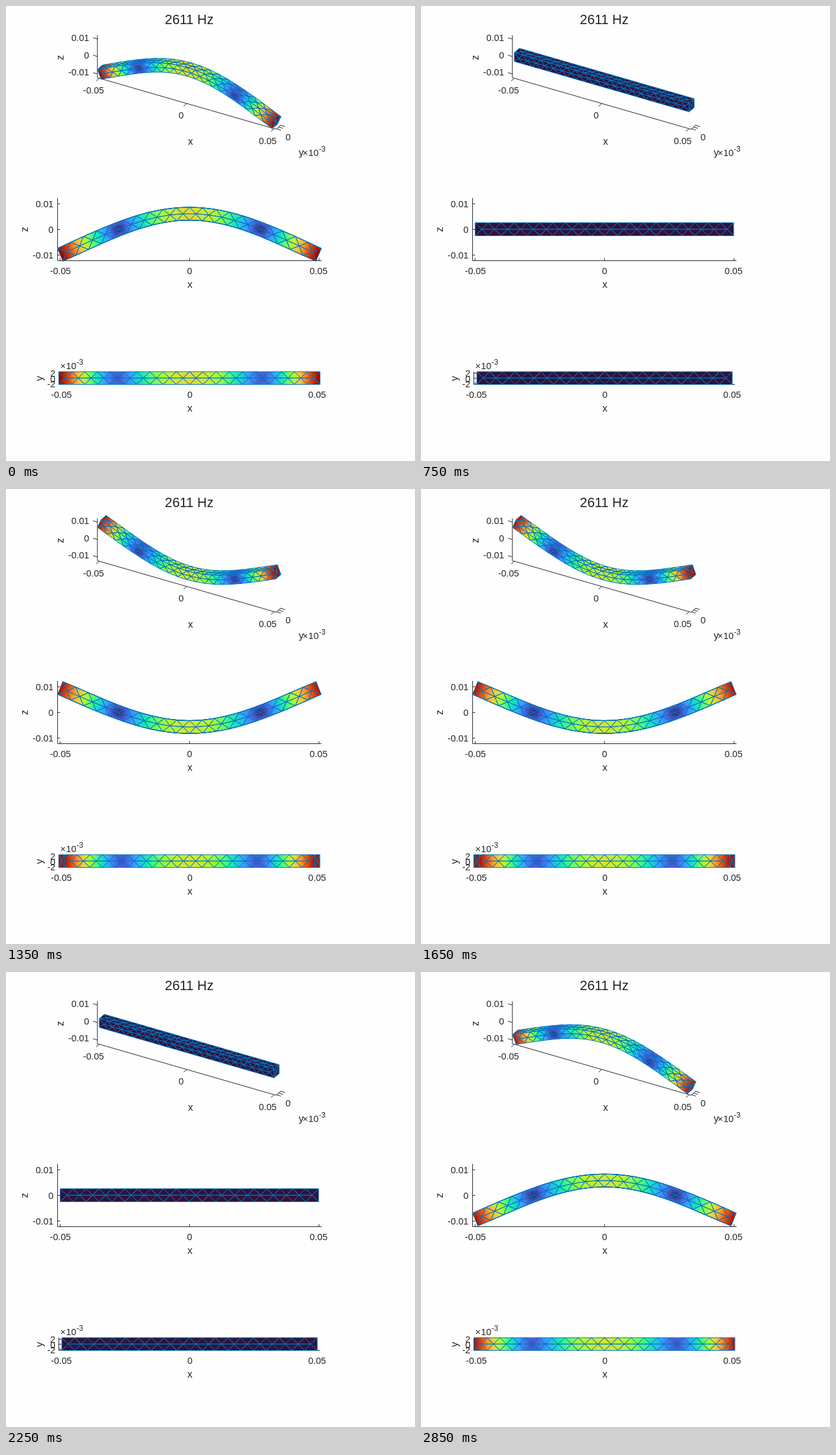
Recreate the animation shown at these times as an HTML page with a canvas. Size 654 by 728 pixels, loop 3 s.

```html
<!DOCTYPE html>
<html lang="en">
<head>
<meta charset="utf-8">
<title>Beam bending mode</title>
<style>
  html, body { margin: 0; width: 654px; height: 728px; overflow: hidden; background: #fefefe; }
  svg, canvas { position: absolute; left: 0; top: 0; display: block; }
  text { font-family: "Liberation Sans", Arial, sans-serif; font-size: 14.67px; fill: #262626; }
  .label { font-size: 16.1px; }
  .title { font-size: 21.33px; }
  .sup { font-size: 12px; }
</style>
</head>
<body>
<svg id="axes" width="654" height="728" viewBox="0 0 654 728"></svg>
<canvas id="beam" width="654" height="728"></canvas>
<script>
const LOOP = 3000, STEP = 150;
const L = 0.1, H = 0.0025, N = 20;
const AMP = 0.0099, PEAK = 0.01, SHEAR = 0.92;
const X_LIM = 0.0511, Z_LIM = 0.01215;

// ---- views: [x, y, z] in metres to screen pixels
const S = 3228, C30 = Math.cos(Math.PI / 6);
const iso = ([x, y, z]) => [
  293 + S * (C30 * x + 0.5 * y),
  118.5 + S * (0.25 * x - 0.5 * C30 * y - C30 * z)
];
const front = ([x, y, z]) => [293.3 + 4132 * x, 357.2 - 4132 * z];
const above = ([x, y, z]) => [293.5 + 4085 * x, 595.3 - 4085 * y];

// ---- axes and labels
const axes = document.getElementById("axes");

function add(tag, attrs, content) {
  const el = document.createElementNS("http://www.w3.org/2000/svg", tag);
  for (const k in attrs) el.setAttribute(k, attrs[k]);
  if (content) el.textContent = content;
  axes.appendChild(el);
}
const line = (...pts) => add("polyline", {
  points: pts.map(p => p.join()).join(" "), fill: "none", stroke: "#262626", "stroke-width": 1
});
const text = (s, x, y, anchor = "middle", cls = "") =>
  add("text", { x, y, "text-anchor": anchor, class: cls }, s);
const upright = (s, x, y) => add("text", {
  transform: `translate(${x} ${y}) rotate(-90)`, "text-anchor": "middle", class: "label"
}, s);
const tick = ([x, y], dx, dy) => line([x, y], [x + dx, y + dy]);

function power(x, y) {
  text("×", x, y, "start");
  text("10", x + 9.3, y, "start");
  text("-3", x + 26, y - 7, "start", "sup");
}

text("2611 Hz", 293, 29, "middle", "title");

// perspective-style view
line(iso([-X_LIM, -H, Z_LIM]), iso([-X_LIM, -H, -Z_LIM]),
     iso([X_LIM, -H, -Z_LIM]), iso([X_LIM, H, -Z_LIM]));
for (const v of [-1, 0, 1]) {
  tick(iso([-X_LIM, -H, v * 0.01]), -7, -2);
  tick(iso([v * 0.05, -H, -Z_LIM]), -5, 4.4);
  tick(iso([X_LIM, v * 0.002, -Z_LIM]), 7, 2);
}
text("0.01", 133, 56, "end");
text("0", 133, 83.5, "end");
text("-0.01", 133, 111, "end");
text("-0.05", 140, 140);
text("0", 280, 180);
text("0.05", 418.5, 221);
text("0", 451, 214.5);
text("x", 295, 222, "middle", "label");
text("y", 472, 240, "middle", "label");
power(474.3, 240);
upright("z", 92, 82.5);

// side view
line([82.5, 307], [82.5, 407.5], [504.5, 407.5]);
for (const v of [-1, 0, 1]) {
  tick([82.5, Math.round(357 - 41.3 * v) + 0.5], 4, 0);
  tick([Math.round(293 + 206.6 * v) + 0.5, 407.5], 0, -4);
}
text("0.01", 76, 322, "end");
text("0", 76, 363, "end");
text("-0.01", 76, 404, "end");
text("-0.05", 87, 429);
text("0", 293.5, 429);
text("0.05", 499.8, 429);
text("x", 294, 451, "middle", "label");
upright("z", 35, 357.5);

// top view
line([84.5, 585], [84.5, 605.5], [502, 605.5]);
for (const v of [-1, 0, 1]) {
  tick([84.5, Math.round(595 - 8.2 * v) + 0.5], 4, 0);
  tick([293.5 + 204 * v, 605.5], 0, -4);
}
text("2", 79, 592.5, "end");
text("0", 79, 601.5, "end");
text("-2", 79, 609.5, "end");
text("-0.05", 88.5, 627);
text("0", 294, 627);
text("0.05", 497.5, 627);
text("x", 294, 649, "middle", "label");
upright("y", 59, 596);
power(86.8, 581);

// ---- surface mesh: crossed cells on each side, a fan on each end
const nodes = [], tris = [];
const node = (x, y, z) => nodes.push([x, y, z]) - 1;
const ring = [[-H, -H], [H, -H], [H, H], [-H, H]];
const at = i => -L / 2 + L * i / N;

const edges = ring.map(([y, z]) => Array.from({ length: N + 1 }, (_, i) => node(at(i), y, z)));
const left = node(-L / 2, 0, 0), right = node(L / 2, 0, 0);

ring.forEach(([y, z], j) => {
  const k = (j + 1) % 4, a = edges[j], b = edges[k];
  const cy = (y + ring[k][0]) / 2, cz = (z + ring[k][1]) / 2;
  const c = Array.from({ length: N }, (_, i) => node(at(i + 0.5), cy, cz));
  for (let i = 0; i < N; i++) {
    tris.push([a[i], c[i], a[i + 1]], [b[i + 1], c[i], b[i]]);
    if (i) tris.push([a[i], c[i - 1], c[i]], [b[i], c[i], c[i - 1]]);
  }
  tris.push([a[0], b[0], c[0]], [b[N], a[N], c[N - 1]]);
  tris.push([left, b[0], a[0]], [right, a[N], b[N]]);
});

// ---- first free-free bending mode
const Q = 2.36502, K = 2 * Q / L;
const shape = x => (Math.cos(K * x) / Math.cos(Q) + Math.cosh(K * x) / Math.cosh(Q)) / 2;
const slope = x => K * (Math.sinh(K * x) / Math.cosh(Q) - Math.sin(K * x) / Math.cos(Q)) / 2;
const modes = nodes.map(([x, , z]) => [AMP * SHEAR * z * slope(x), -AMP * shape(x)]);

// ---- turbo colour map
const turbo = ("30123b 4145ab 4675ed 39a2fc 1bcfd4 24eca6 61fc6c a4fc3b " +
  "d1e834 f3c63a fe9b2d f36315 d93806 b11901 7a0402").split(" ")
  .map(h => [0, 2, 4].map(i => parseInt(h.slice(i, i + 2), 16)));
const TOP = turbo.length - 1;

function color(v) {
  const i = Math.min(TOP - 1, Math.floor(v)), f = Math.min(1, v - i);
  return `rgb(${turbo[i].map((c, n) => Math.round(c + (turbo[i + 1][n] - c) * f))})`;
}

const ctx = document.getElementById("beam").getContext("2d");

// linear colour ramp matching the values at the three corners
function ramp(p, v, area) {
  const lo = Math.min(...v), hi = Math.max(...v), span = hi - lo;
  if (span < 0.02) return color(lo);
  const [[x0, y0], [x1, y1], [x2, y2]] = p;
  const d1 = v[1] - v[0], d2 = v[2] - v[0];
  const gx = (d1 * (y2 - y0) - d2 * (y1 - y0)) / area;
  const gy = (d2 * (x1 - x0) - d1 * (x2 - x0)) / area;
  const s = span / (gx * gx + gy * gy);
  const [x, y] = p[v.indexOf(lo)];
  const g = ctx.createLinearGradient(x, y, x + gx * s, y + gy * s);
  g.addColorStop(0, color(lo));
  for (let k = Math.ceil(lo); k < hi; k++) g.addColorStop((k - lo) / span, color(k));
  g.addColorStop(1, color(hi));
  return g;
}

function drawView(view, pts, vals) {
  const flat = pts.map(view), mesh = new Path2D();
  for (const t of tris) {
    const p = t.map(i => flat[i]);
    const [[x0, y0], [x1, y1], [x2, y2]] = p;
    const area = (x1 - x0) * (y2 - y0) - (x2 - x0) * (y1 - y0);
    if (area > -0.05) continue;
    const path = new Path2D();
    path.moveTo(x0, y0);
    path.lineTo(x1, y1);
    path.lineTo(x2, y2);
    path.closePath();
    ctx.fillStyle = ramp(p, t.map(i => vals[i]), area);
    ctx.fill(path);
    mesh.addPath(path);
  }
  ctx.stroke(mesh);
}

function draw(step) {
  const c = Math.cos(2 * Math.PI * step * STEP / LOOP);
  const pts = nodes.map(([x, y, z], i) => [x + c * modes[i][0], y, z + c * modes[i][1]]);
  const vals = modes.map(m => Math.min(TOP, TOP * Math.abs(c) * Math.hypot(...m) / PEAK));
  ctx.clearRect(0, 0, 654, 728);
  ctx.strokeStyle = "#0072bd";
  ctx.lineWidth = 1;
  ctx.lineJoin = "round";
  for (const view of [iso, front, above]) drawView(view, pts, vals);
}

const start = performance.now();
let shown = -1;

function tickFrame() {
  const step = Math.floor(((performance.now() - start) % LOOP) / STEP);
  if (step !== shown) draw(shown = step);
  requestAnimationFrame(tickFrame);
}
tickFrame();
</script>
</body>
</html>
```
